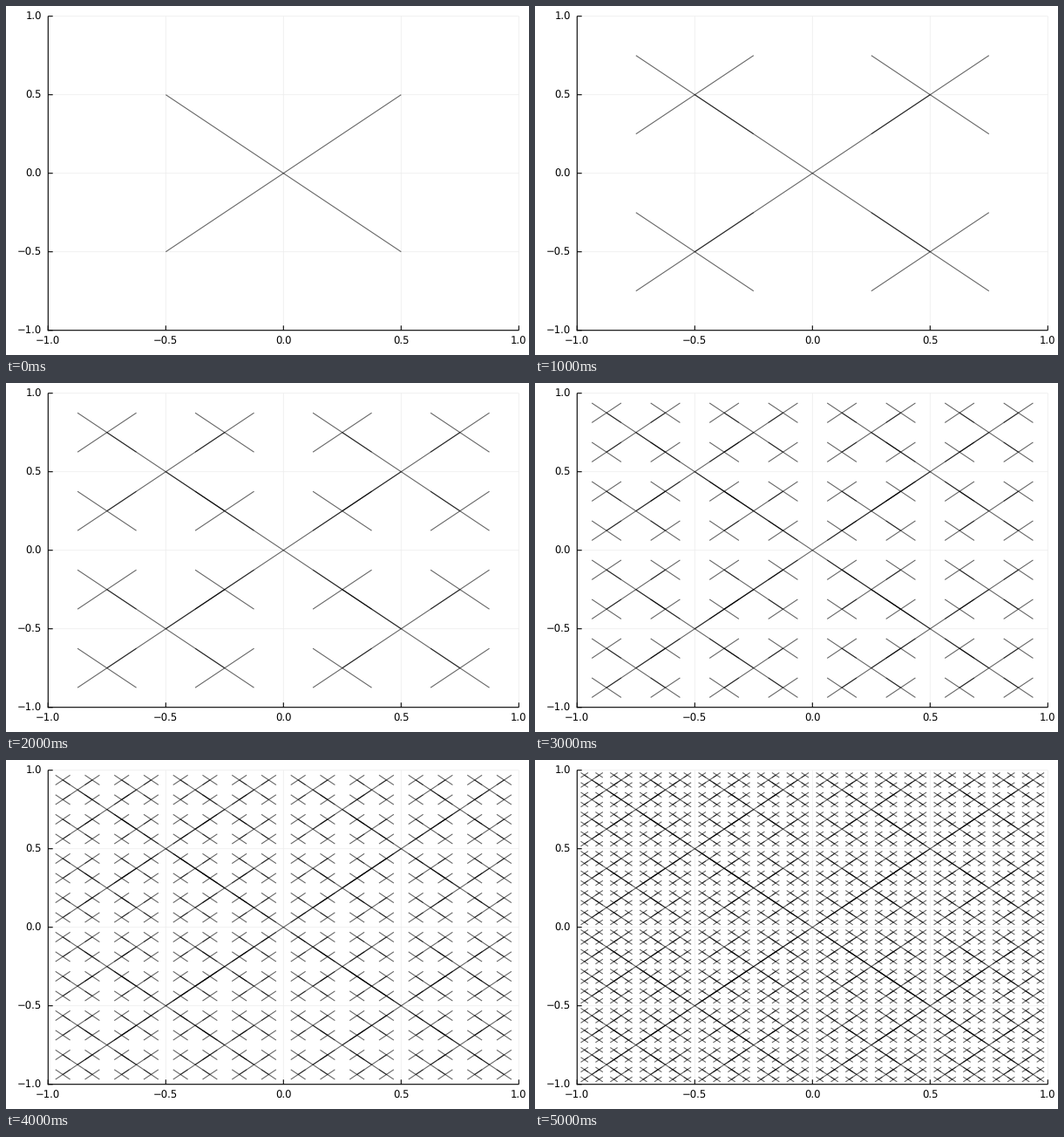
Recreate the animation shown at these times as a matplotlib script. Size 600x400 px, loop 6000 ms.

```python
import numpy as np
import matplotlib.pyplot as plt
from matplotlib.animation import FuncAnimation
from matplotlib.collections import LineCollection

W, H, DPI = 600, 400, 100
PT = 72 / DPI                       # points per pixel
CX, CY, RX, RY = 318.3, 191.7, 270, 180
LEVELS = 6

plt.rcParams["font.family"] = "DejaVu Sans"
plt.rcParams["text.hinting"] = "none"

fig = plt.figure(figsize=(W / DPI, H / DPI), dpi=DPI, facecolor="white")
ax = fig.add_axes([0, 0, 1, 1])
ax.set_xlim(0, W)
ax.set_ylim(H, 0)
ax.axis("off")


def to_px(x, y):
    return CX + RX * x, CY - RY * y


def rule(xs, ys, color, width, z):
    ax.plot(xs, ys, color=color, lw=width * PT, zorder=z,
            solid_capstyle="butt", snap=False)


def draw_axes():
    left, top = to_px(-1, 1)
    right, bottom = to_px(1, -1)
    for v in np.linspace(-1, 1, 5):
        x, y = to_px(v, v)
        rule([x, x], [top, bottom], "#ededed", 0.8, 1)
        rule([left, right], [y, y], "#ededed", 0.8, 1)
        rule([x, x], [bottom, bottom - 5.4], "black", 1.1, 4)
        rule([left, left + 5.4], [y, y], "black", 1.1, 4)
        label = f"{v:.1f}".replace("-", "\u2212")
        style = dict(fontsize=11.6 * PT, color="black")
        ax.text(x, 387.4, label, ha="center", va="baseline", **style)
        ax.text(40.8, y + 4.3, label, ha="right", va="baseline", **style)
    rule([left, left], [top, bottom + 0.5], "black", 1.1, 4)
    rule([left - 0.5, right], [bottom, bottom], "black", 1.1, 4)


def crosses(level):
    """Diagonals of every cross at one depth of the subdivision."""
    arm = 0.5 ** (level + 1)
    centres = -1 + arm * (2 * np.arange(2 ** level) + 1) * 2
    segs = []
    for x in centres:
        for y in centres:
            for s in (1, -1):
                segs.append([to_px(x - arm, y - s * arm),
                             to_px(x + arm, y + s * arm)])
    return segs


draw_axes()
depths = [crosses(n) for n in range(LEVELS)]
lines = LineCollection([], colors=[(0, 0, 0, 0.6)], linewidths=1.1 * PT,
                       capstyle="butt", zorder=3)
ax.add_collection(lines)


def update(i):
    lines.set_segments(sum(depths[:i + 1], []))
    return [lines]


anim = FuncAnimation(fig, update, frames=LEVELS, interval=1000,
                     init_func=lambda: update(0), repeat=True,
                     repeat_delay=0, blit=False)
plt.show()
```
